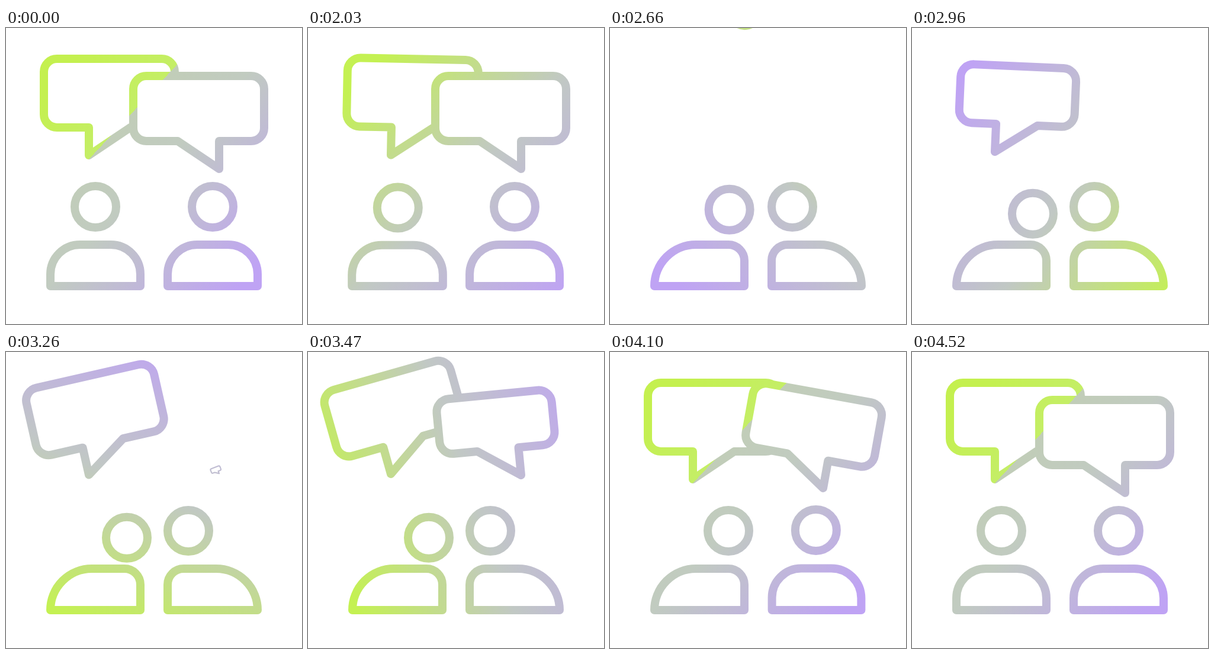
An HTML page for the animation above (4550 ms loop, 500x500 px).

```html
<!DOCTYPE html>
<html lang="en">
<head>
<meta charset="utf-8">
<title>Conversation</title>
<style>
  html, body { margin: 0; width: 100%; height: 100%; overflow: hidden; background: #fff; }
  svg { display: block; width: 100%; height: 100%; }
</style>
</head>
<body>
<svg viewBox="0 0 500 500">
  <defs>
    <linearGradient id="smooth" gradientUnits="userSpaceOnUse">
      <stop offset="0" stop-color="#c4f152"/>
      <stop offset=".5" stop-color="#c1c8c4"/>
      <stop offset="1" stop-color="#bfa3f4"/>
    </linearGradient>
    <linearGradient id="split" gradientUnits="userSpaceOnUse">
      <stop offset="0" stop-color="#c4f04f"/>
      <stop offset=".262" stop-color="#c4ee66"/>
      <stop offset=".262" stop-color="#c1cdb8"/>
      <stop offset=".453" stop-color="#c1cbc0"/>
      <stop offset=".924" stop-color="#bfa3f4"/>
    </linearGradient>
  </defs>
  <g id="icon" fill="none" stroke-width="14" stroke-linejoin="round">
    <path id="bodyL"/><path id="bodyR"/>
    <circle id="headL" r="35"/><circle id="headR" r="35"/>
    <path id="bubbleL"/><path id="bubbleR" fill="#fff"/>
  </g>
</svg>
<script>
const LOOP = 4550, START = 2000;
const el = id => document.getElementById(id);
const clamp = x => Math.min(1, Math.max(0, x));
const smooth = x => x * x * (3 - 2 * x);
const set = (node, attrs) => { for (const k in attrs) node.setAttribute(k, attrs[k]); };

// Smooth monotone curve through [time, value] points
function curve(t, pts) {
  const last = pts.length - 1;
  if (t <= pts[0][0]) return pts[0][1];
  if (t >= pts[last][0]) return pts[last][1];
  const slope = i => (pts[i + 1][1] - pts[i][1]) / (pts[i + 1][0] - pts[i][0]);
  const tangent = i => {
    if (i === 0 || i === last) return 0;
    const a = slope(i - 1), b = slope(i);
    return a * b > 0 ? 2 * a * b / (a + b) : 0;
  };
  let i = 0;
  while (t > pts[i + 1][0]) i++;
  const w = pts[i + 1][0] - pts[i][0], x = (t - pts[i][0]) / w, s = smooth(x);
  return pts[i][1] * (1 - s) + pts[i + 1][1] * s
    + w * x * (1 - x) * ((1 - x) * tangent(i) - x * tangent(i + 1));
}

const squashKeys = [[0, 0], [.25, 1], [.7, -.6], [1, 0]];

const people = [
  { side: 'L', dir: 1, x: 151, shift: 49, lean: 2000, back: 4110 },
  { side: 'R', dir: -1, x: 349, shift: 41, lean: 2060, back: 3740 }
];

const bubbles = [
  { side: 'L', dir: 1, x: 140, y: 215, h: 116, leave: 2000, enter: 2700,
    rot: [[2700, 22], [2960, 2.5], [3080, -6], [3440, -16], [3640, -11.3], [4040, 0]],
    size: [[2700, 0], [2960, .88], [3120, 1]],
    lift: [[2700, 212], [2960, 209], [3470, 206], [3640, 197], [4040, 215]] },
  { side: 'R', dir: -1, x: 360, y: 238, h: 110, leave: 2210, enter: 3210,
    rot: [[3210, -22], [3470, -5.5], [3930, 17.5], [4100, 10.2], [4175, 7], [4500, 0]],
    size: [[3210, 0], [3470, .88], [3650, 1]],
    lift: [[3210, 205], [3470, 208], [3750, 219], [4100, 230], [4500, 238]] }
];

function drawPerson(p, t) {
  const go = clamp((t - p.lean) / 400), ret = clamp((t - p.back) / 400);
  const lean = smooth(go) - smooth(ret);
  const k = curve(go, squashKeys) + curve(ret, squashKeys);
  const nod = p.dir > 0 ? curve(t, [[2410, 0], [2980, 1], [3520, 1], [4090, 0]]) : 0;
  set(el('head' + p.side), {
    cx: p.x + p.dir * p.shift * lean + 4 * nod,
    cy: 302 + 7 * k + 11.8 * nod
  });
  const half = 76 * (1 + .05 * k), height = 70 * (1 - .045 * k), top = 436 - height;
  const outer = Math.min(height, 50 + 20 * lean), inner = 50 - 23 * lean;
  const d = p.dir, a = p.x - d * half, b = p.x + d * half, sweep = d > 0 ? 1 : 0;
  el('body' + p.side).setAttribute('d',
    `M${a} 436V${top + outer}A${outer} ${outer} 0 0 ${sweep} ${a + d * outer} ${top}` +
    `H${b - d * inner}A${inner} ${inner} 0 0 ${sweep} ${b} ${top + inner}V436Z`);
}

// Outline placed by the tip of its tail; the tail reaches full size before the box
function bubblePath(b, y, rot, size) {
  const s = Math.min(1, size / .85), gap = 1 - size / s;
  const c = Math.cos(rot * Math.PI / 180) * s, n = Math.sin(rot * Math.PI / 180) * s;
  const at = (px, py) => {
    const qx = px * b.dir;
    return `${(b.x + c * qx - n * py).toFixed(2)} ${(y + n * qx + c * py).toFixed(2)}`;
  };
  const r = 22, low = -47, top = low - b.h + 142 * gap;
  const lt = -76 + 106 * gap, rt = 145 - 110 * gap;
  const arc = (x, y) => `A${r * s} ${r * s} 0 0 ${b.dir > 0 ? 1 : 0} ${at(x, y)}`;
  return `M${at(lt + r, top)}L${at(rt - r, top)}${arc(rt, top + r)}` +
    `L${at(rt, low - r)}${arc(rt - r, low)}L${at(70, low)}L${at(0, 0)}L${at(0, low)}` +
    `L${at(lt + r, low)}${arc(lt, low - r)}L${at(lt, top + r)}${arc(lt + r, top)}Z`;
}

function drawBubble(b, t) {
  let y, rot, size = 1;
  if (t < b.enter) {
    const x = Math.max(0, t - b.leave) / 420;
    y = b.y - 265 * x ** 2.4;
    rot = b.dir * 45 * x ** 1.4;
  } else {
    y = curve(t, b.lift);
    rot = curve(t, b.rot);
    size = curve(t, b.size);
  }
  set(el('bubble' + b.side), {
    d: size > .02 ? bubblePath(b, y, rot, size) : '',
    'stroke-width': 14 * Math.min(1, size * 2)
  });
}

function drawGradient(t) {
  const turn = clamp((t - START) / 2000), moving = turn > 0 && turn < 1;
  const angle = (43 + 360 * smooth(turn)) * Math.PI / 180;
  const dx = 250 * Math.cos(angle), dy = 250 * Math.sin(angle);
  const name = moving ? 'smooth' : 'split';
  set(el(name), { x1: 280 - dx, y1: 246 - dy, x2: 280 + dx, y2: 246 + dy });
  el('icon').setAttribute('stroke', `url(#${name})`);
}

function draw(t) {
  drawGradient(t);
  people.forEach(p => drawPerson(p, t));
  bubbles.forEach(b => drawBubble(b, t));
}

let origin = null;
function tick(now) {
  if (origin === null) origin = now;
  draw((now - origin) % LOOP);
  requestAnimationFrame(tick);
}
draw(0);
requestAnimationFrame(tick);
</script>
</body>
</html>
```
